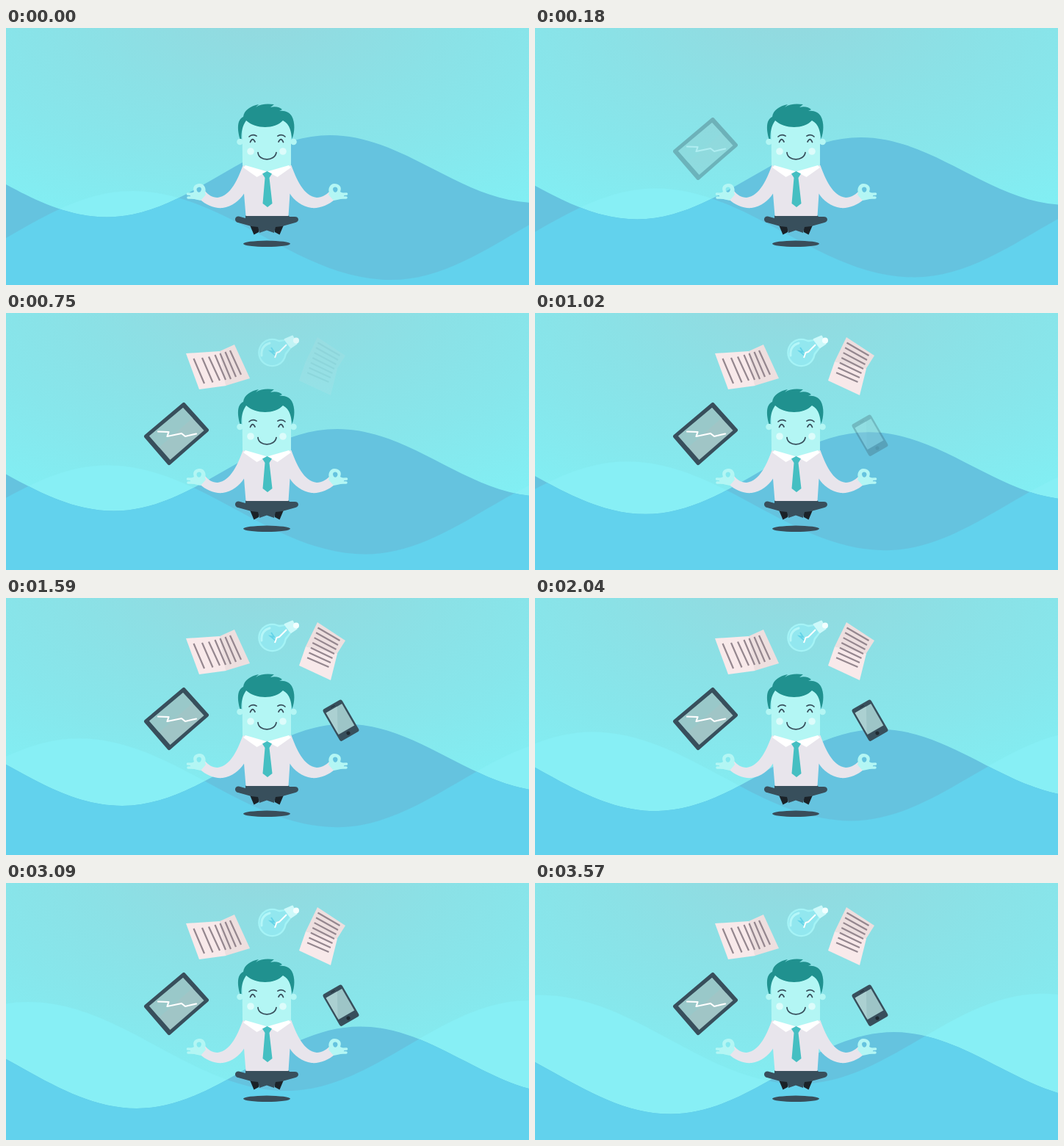
These frames come from a looping animation (712 by 350 pixels, 3600 ms). An HTML page:

```html
<!DOCTYPE html>
<html lang="en">
<head>
<meta charset="utf-8">
<title>Calm at work</title>
<style>
html, body { margin: 0; width: 100%; height: 100%; overflow: hidden; }
svg { display: block; width: 712px; height: 350px; }
.ink { fill: none; stroke: #384e5b; stroke-width: 1.7; stroke-linecap: round; }
.rule { fill: none; stroke: #95878f; stroke-width: 2.2; }
.skin { fill: #b3f6f4; }
.slate { fill: #384f5c; }
.item { opacity: 0; }
</style>
</head>
<body>
<svg viewBox="0 0 712 350" xmlns="http://www.w3.org/2000/svg">
  <defs>
    <radialGradient id="sky" gradientUnits="userSpaceOnUse" cx="0" cy="0" r="330" gradientTransform="translate(350 -25) scale(1.9 1)">
      <stop offset="0" stop-color="#94d8de"/>
      <stop offset=".4" stop-color="#8be1e6"/>
      <stop offset=".65" stop-color="#87e6eb"/>
      <stop offset="1" stop-color="#81eff4"/>
    </radialGradient>
    <path id="backWave"/>
    <path id="frontWave"/>
    <clipPath id="inBack"><use id="backClip" href="#backWave"/></clipPath>
    <g id="hand" class="skin">
      <path fill-rule="evenodd" d="M256 223C253 216 258 212 264 212C270 212 273 219 271 224L272 227L265 235C260 234 255 233 252 232L250 226ZM259.500 220C260 225 265.500 225 266 219.500C266 215.500 259.500 215.500 259.500 220Z"/>
      <path d="M247.500 226L259 226.500M248 231L260 231" fill="none" stroke="#b3f6f4" stroke-width="3.600" stroke-linecap="round"/>
    </g>
  </defs>

  <rect width="712" height="350" fill="url(#sky)"/>
  <use class="front" href="#frontWave" fill="#87eff5"/>
  <use class="back" href="#backWave" fill="#65c3df"/>
  <g clip-path="url(#inBack)"><use class="front" href="#frontWave" fill="#62d2ed"/></g>

  <!-- tablet -->
  <g class="item">
    <path class="slate" stroke="#384f5c" stroke-width="5" stroke-linejoin="round" d="M242 124.500L273.500 159.500L222 204.500L190.500 168Z"/>
    <path fill="#a0c5c6" d="M241 129L269.500 160L223.500 200L195 167.500Z"/>
    <path fill="#95cbcc" d="M241 129L254 143L208.500 183L195 167.500Z" opacity=".6"/>
    <path fill="none" stroke="#fff" stroke-width="2.200" stroke-linejoin="round" stroke-linecap="round" d="M207 161.500L221.500 162L219.500 168L239 164L244 168L259 164.500"/>
  </g>

  <!-- wide sheet -->
  <g class="item">
    <path fill="#f8e9ea" d="M245 55L291 52L300 99L263 104Z"/>
    <path fill="#eddfdf" d="M291 52L311 43L332 89L299 99Z"/>
    <path class="rule" d="M255.500 62L270 96M267 61L281.500 94.500M276 59.500L291 92M284.500 57L299 91M291.500 55L306 90M298.500 53L313 87M305 51L320 84"/>
  </g>

  <!-- bulb -->
  <g class="item">
    <circle cx="362.500" cy="54" r="19.300" fill="#a5f3f6"/>
    <path fill="#a5f3f6" d="M368 37L381 36L389 47L380 59Z"/>
    <circle cx="362.500" cy="54" r="17" fill="#92e7ef"/>
    <path fill="#92e7ef" d="M369 40L380 38L386 47L378 57Z"/>
    <path fill="none" stroke="#b5f6f8" stroke-width="3" stroke-linecap="round" d="M348 58C347 48 352 43 359 41"/>
    <path fill="none" stroke="#63d3e8" stroke-width="1.800" d="M361 47L365 53L360 52L367 58"/>
    <path fill="none" stroke="#fff" stroke-width="2" stroke-linejoin="round" d="M366 61L368.500 54L372 53L382 43"/>
    <path fill="#cdf9fa" stroke="#cdf9fa" stroke-width="2" stroke-linejoin="round" d="M379.500 36L390 31.500L395.500 42L388 47Z"/>
    <circle cx="395" cy="37.500" r="4" fill="#f3ffff"/>
  </g>

  <!-- tall sheet -->
  <g class="item">
    <path fill="#eddfdf" d="M424 33L462 58L450 77L408 66Z"/>
    <path fill="#f8e9ea" d="M408 66L451 76L442 112L399 92Z"/>
    <path class="rule" id="tallRules"/>
  </g>

  <!-- phone -->
  <g class="item">
    <g transform="translate(456 166.700) rotate(-30)">
      <rect class="slate" x="-15" y="-25" width="30" height="50" rx="3"/>
      <rect x="-12.500" y="-19" width="25" height="34" fill="#9dc5c7"/>
      <path d="M-12.500 -19H5L-12.500 13Z" fill="#abd0d1"/>
      <path d="M-3 -22H3" stroke="#26343d" stroke-width="1.200"/>
      <circle cy="20" r="2.500" fill="#1f2a32"/>
    </g>
  </g>

  <!-- person -->
  <ellipse cx="355" cy="293.800" rx="32" ry="4.200" fill="#394d5a"/>
  <path fill="#1b2228" d="M331 266L345 268L344 278L337.500 281.500ZM379 266L365 268L366 278L372.500 281.500Z"/>
  <path class="slate" d="M326 255H384.500L386 257H393C399.500 257 399.500 264 394 265L376 270L367 271L365 279L355 275.500L345 279L343 271L334 270L316 265C310.500 264 310.500 256 317 256.500L326 259Z"/>
  <path fill="#e8e5ec" d="M322.500 187C316 205 306 229 288 231C281 231 275 227 271 222L263.500 233C272 241 284 246 295 245C308 243 318 235 324 225.500L326.500 256H384.500L386.500 225.500C392 235 403 243 416 245C427 246 439 241 447 234L440 223C436 227 430 231 423 231C405 229 395 205 388.500 187Z"/>
  <use href="#hand"/>
  <use href="#hand" transform="matrix(-1 0 0 1 711 0)"/>

  <circle class="skin" cx="318.500" cy="155" r="4.300"/>
  <circle class="skin" cx="391.500" cy="155" r="4.300"/>
  <path class="skin" d="M321.500 122H388V187L355.500 197L322 187Z"/>
  <path fill="#fff" d="M326 187L323 190L341.500 203L355.500 195.500ZM385 187L388 190L369.500 203L355.500 195.500Z"/>
  <path fill="#45bfc2" d="M349 198.500L355.500 195L362 198.500L358.500 204L362.500 239L356 244L349.500 239L352.500 204Z"/>
  <path fill="#20918f" d="M318.500 151C315 139 314 125 323 121C324 112 333 106 344 104L340 108C347 103 356 103 365 104L360 108C367 106 373 108 376 111L372 113C380 112 386 115 389 120C394 129 393 142 389.500 151C388 142 387 131 377 126C366 138 340 138 327 126C322 133 320 142 320.500 151Z"/>
  <path class="ink" d="M331 148Q335 144 341 147M370 147Q376 144 380 148M332.500 155.500Q335.500 148 339 155M371 155Q374.500 148 377.500 155.500"/>
  <circle cx="333" cy="168" r="4.800" fill="#dcfcfb"/>
  <circle cx="377" cy="168" r="4.800" fill="#dcfcfb"/>
  <path class="ink" d="M343 169.500C344 182 366 182 368 169.500"/>
</svg>
<script>
const LOOP = 3600, STEP = 30;
const FADE = { first: 80, gap: 214, length: 300 };
const $ = s => document.querySelector(s);
const all = s => [...document.querySelectorAll(s)];

// Smooth swell through alternating crests and troughs, filled downwards.
function swell(points) {
  let d = `M${points[0]}`;
  points.slice(1).forEach(([x, y], i) => {
    const [px, py] = points[i], k = (x - px) * 0.364;
    d += `C${px + k},${py} ${x - k},${y} ${x},${y}`;
  });
  return `${d}V500H${points[0][0]}Z`;
}

$('#backWave').setAttribute('d',
  swell([[-178, 146], [137, 257.5], [441, 146], [722, 238], [1020, 146]]));
$('#frontWave').setAttribute('d',
  swell([[-160, 343], [172, 222], [524, 343], [854, 220], [1200, 343]]));

// Seven text lines, evenly spaced down the tall sheet.
$('#tallRules').setAttribute('d', [...Array(7).keys()].map(i =>
  `M${424.5 - 2.4 * i},${40.5 + 6.8 * i}L${454.5 - 2.5 * i},${58 + 6 * i}`).join(''));

const backs = [...all('.back'), $('#backClip')];
const fronts = all('.front');
const items = all('.item');

function shift(nodes, x, y) {
  nodes.forEach(n => n.setAttribute('transform', `translate(${x} ${y})`));
}

function draw(ms) {
  const t = Math.floor(ms / STEP) * STEP;
  shift(backs, t * 0.0133, t * 0.016);
  shift(fronts, t * -0.046, t * -0.0194);
  items.forEach((n, i) => {
    const p = (t - FADE.first - i * FADE.gap) / FADE.length;
    n.style.opacity = Math.max(0, Math.min(1, p));
  });
}

const start = performance.now();
function tick() {
  draw((performance.now() - start) % LOOP);
  requestAnimationFrame(tick);
}
draw(0);
requestAnimationFrame(tick);
</script>
</body>
</html>
```
